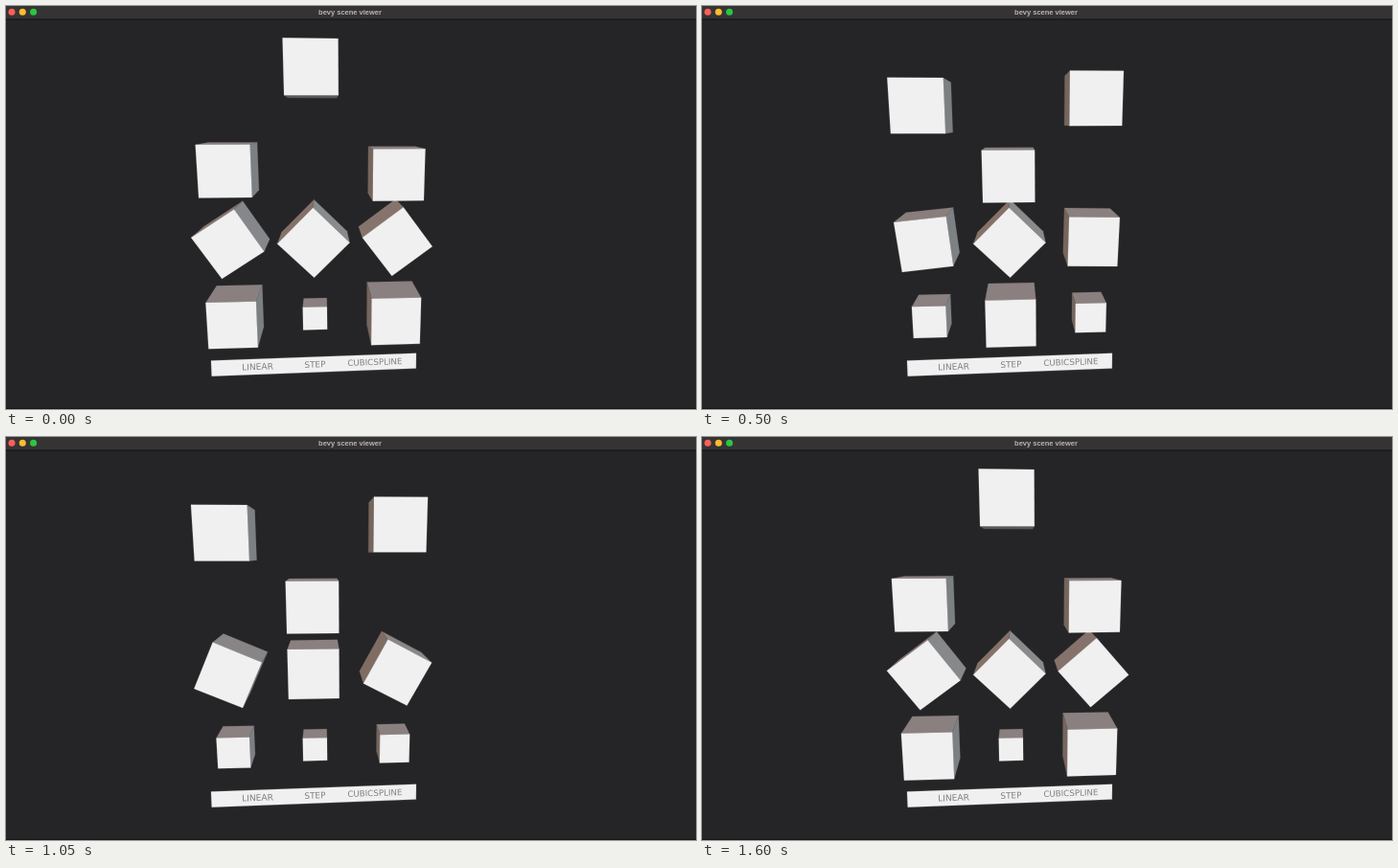
These frames come from a looping animation (720 by 421 pixels, 1.65 s). An HTML page with a canvas:

```html
<!DOCTYPE html>
<html lang="en">
<head>
<meta charset="utf-8">
<title>bevy scene viewer</title>
<style>
  html, body { margin: 0; height: 100%; overflow: hidden; background: #252527; }
  canvas { display: block; }
</style>
</head>
<body>
<canvas id="stage" width="720" height="421"></canvas>
<script>
const ctx = document.getElementById('stage').getContext('2d');
const LOOP = 1650, STEP = 50;
const CYCLE = 1667; // the scene's own period, cut slightly short by the loop
const COLUMN = 3.265, HALF_SIDE = 0.985;
const RAD = Math.PI / 180;

// Camera: position, yaw to the right, pitch downwards, focal length in pixels.
const eye = [0.386, 4.569, 18.655], focal = 491, centre = [360, 217.5];
const sa = Math.sin(3.43 * RAD), ca = Math.cos(3.43 * RAD);
const sb = Math.sin(11 * RAD), cb = Math.cos(11 * RAD);

function project(x, y, z) {
  x -= eye[0]; y -= eye[1]; z -= eye[2];
  const right = ca * x + sa * z;
  const up = sa * sb * x + cb * y - ca * sb * z;
  const depth = sa * cb * x - sb * y - ca * cb * z;
  return [centre[0] + focal * right / depth, centre[1] - focal * up / depth];
}

function polygon(points, color) {
  ctx.beginPath();
  points.forEach(p => ctx.lineTo(...p));
  ctx.closePath();
  ctx.fillStyle = ctx.strokeStyle = color;
  ctx.lineWidth = 0.2;
  ctx.fill();
  ctx.stroke();
}

// Side colours by direction of the normal, in degrees from the right.
const shades = [
  [0, 125, 128, 131], [45, 136, 138, 140], [90, 138, 128, 127],
  [135, 133, 113, 104], [180, 117, 101, 92], [270, 88, 88, 87], [360, 125, 128, 131]
];
function shade(angle) {
  angle = (angle % 360 + 360) % 360;
  const i = shades.findIndex(s => s[0] > angle);
  const a = shades[i - 1], b = shades[i], k = (angle - a[0]) / (b[0] - a[0]);
  return `rgb(${[1, 2, 3].map(c => a[c] + (b[c] - a[c]) * k)})`;
}

function cube(x, y, scale, angle) {
  const half = HALF_SIDE * scale;
  const corner = (k, z) => {
    const a = (45 + 90 * k + angle) * RAD, r = Math.SQRT2 * half;
    return project(x + r * Math.cos(a), y + r * Math.sin(a), z * half);
  };
  for (let k = 0; k < 4; k++) {
    const face = [corner(k, 1), corner(k + 1, 1), corner(k + 1, -1), corner(k, -1)];
    const [p, q, r] = face;
    const facing = (q[0] - p[0]) * (r[1] - p[1]) - (q[1] - p[1]) * (r[0] - p[0]);
    if (facing > 0) polygon(face, shade(90 * (k + 1) + angle));
  }
  polygon([0, 1, 2, 3].map(k => corner(k, 1)), '#f0f0f0');
}

const hermite = (u, m0, m1) =>
  u * u * (3 - 2 * u) + m0 * u * (1 - u) ** 2 + m1 * u * u * (u - 1);
const linear = u => u;
const smooth = u => hermite(u, 0, 0);
// Half-cycles elapsed since a key at time `start`, from 0 to 2.
const halves = (t, start) => ((t - start + CYCLE) % CYCLE) / CYCLE * 2;
const pingpong = (h, ease) => h < 1 ? ease(h) : 1 - ease(h - 1);
// Two eighth turns, each with its own tangents at the keys.
const turn = h => h < 1 ? hermite(h, -0.96, -1.48) : 1 + hermite(h - 1, -0.27, -0.77);
const between = (t, from, to) => t >= from && t < to;

function text(str, x, y, font, color, tilt = 0) {
  ctx.save();
  ctx.translate(x, y);
  ctx.rotate(tilt * RAD);
  ctx.font = font;
  ctx.fillStyle = color;
  ctx.textAlign = 'center';
  ctx.fillText(str, 0, 0);
  ctx.restore();
}

function drawWindow() {
  ctx.fillStyle = '#252527';
  ctx.fillRect(0, 0, 720, 421);
  ctx.fillStyle = '#363335';
  ctx.fillRect(0, 0, 720, 13.5);
  ctx.fillStyle = '#141415';
  ctx.fillRect(0, 13.5, 720, 1);
  ctx.fillRect(0, 420, 720, 1);
  ['#fe5f57', '#febc2e', '#28c840'].forEach((color, i) => {
    ctx.beginPath();
    ctx.arc(6 + 11.3 * i, 6.2, 3.5, 0, 7);
    ctx.fillStyle = color;
    ctx.fill();
  });
  text('bevy scene viewer', 359, 8.7, 'bold 7.5px "Liberation Sans", Arial, sans-serif', '#b9b5b6');
}

function drawPlate() {
  polygon([[214, 370.5], [428, 362.7], [427.8, 378.6], [214.7, 386.8]], '#f0f0f0');
  const label = (str, x, y, size) =>
    text(str, x, y, `${size}px "DejaVu Sans", sans-serif`, '#808082', -2);
  label('LINEAR', 262.6, 380, 9.1);
  label('STEP', 322.5, 377.5, 8.9);
  label('CUBICSPLINE', 385, 375, 8.7);
}

function draw(t) {
  drawWindow();
  drawPlate();
  const move = halves(t, -45), spin = halves(t, 607);
  const row = (values, place) => values.forEach((v, i) => place((i - 1) * COLUMN, v));
  const slide = step => [pingpong(move, linear), step, pingpong(move, smooth)];

  row(slide(between(t, 200, 800) ? 0 : 1), (x, v) => cube(x, -3.306, 1.015 - 0.515 * v, 0));
  row([spin, between(t, 525, 1350) ? 0 : 1, turn(spin)], (x, v) => cube(x, 0, 1, -45 * v));
  row(slide(between(t, 475, 1525) ? 0 : 1), (x, v) => cube(x, 2.585 + 3.955 * v, 1, 0));
}

const start = performance.now();
function frame() {
  const t = (performance.now() - start) % LOOP;
  draw(Math.floor(t / STEP) * STEP);
  requestAnimationFrame(frame);
}
frame();
</script>
</body>
</html>
```
